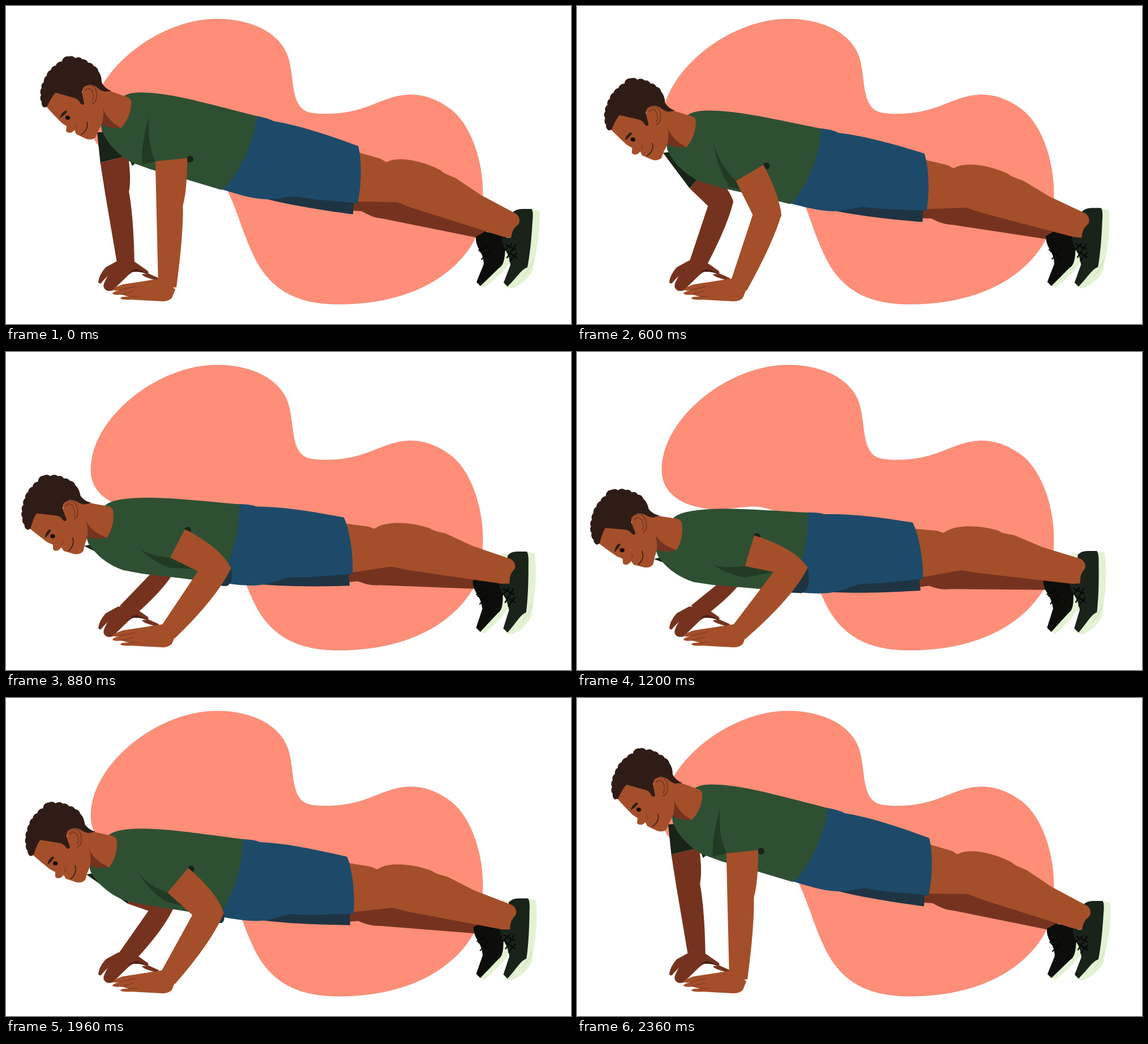
Animation of 998 by 561 pixels, one loop 2.4 s. Source, as an HTML page:

```html
<!DOCTYPE html>
<html lang="en">
<head>
<meta charset="utf-8">
<title>Push-up</title>
<style>
  html, body { margin: 0; width: 100%; height: 100%; overflow: hidden; background: #fff; }
  svg { display: block; width: 100vw; height: 100vh; }
  .skin { fill: #a44f2a; }
  .shade { fill: #75331f; }
  .hair { fill: #301c16; }
  .shirt { fill: #2f4f33; }
  .fold { fill: #223a24; }
  .dark { fill: #172417; }
  .sole { fill: #e2f2d2; }
  .line { fill: none; stroke-linecap: round; stroke-linejoin: round; }
</style>
</head>
<body>
<svg viewBox="0 0 998 561">
  <path fill="#ff8e78" stroke="#dc7c69" stroke-width=".6" d="M372 23C440 23 486 52 498 90C511 130 499 187 545 189.500Q556 191 567 190.500C620 190 645 174 675 164C720 148 755 160 785 182C822 210 842 275 842 330C842 370 836 397 826 415C793 474 715 526 588 526C520 526 470 505 440 445C420 405 412 370 395 333C385 305 365 285 340 277C305 266 285 278 245 277C190 275 150 252 150 208C150 115 270 23 372 23Z"/>

  <path id="farArm" class="shade"/>
  <path class="shade" d="M198 449L176 461Q164 475 163 487Q166 493 171 485L180 476Q170 492 173 497Q177 505 188 502L222 469L238 469L249 473Q254 471 250 467L227 451Z"/>
  <path fill="#4d2016" d="M217 474Q221 463 232 464L251 472L234 469Q224 467 217 474Z"/>
  <path class="shade" d="M240 473L252 472L270 480L268 485L252 480Q242 477 240 473Z"/>
  <path id="farSleeve" class="dark"/>

  <g class="body">
    <path class="shade" d="M610 343L692 343L725 355L850 396L846 405L838 410L665 375C645 373 637 366 628 362L612 361Z"/>
  </g>
  <g class="shoe">
    <path class="sole" d="M884 360L897 364L890 450Q888 462 845 497L836 493Z"/>
    <path fill="#0d0e0c" d="M846 398L884 405L881 440Q879 458 871 462L838 494L831 487L844 455Q843 440 836 430Q829 418 830 407Z"/>
    <path class="line" stroke="#050605" stroke-width="2" d="M837 433L854 444M840 447L855 431M835 431L850 424"/>
  </g>
  <g class="shoe">
    <path class="sole" d="M926 358L942 361C945 395 938 430 931 460C933 472 905 498 890 498L881 494Z"/>
    <path fill="#19231a" d="M894 365Q900 358 912 358L928 358Q932 361 930 380C928 415 925 440 921 461C911 464 903 478 886 495L879 488L891 457Q889 442 884 434Q875 418 876 408L892 409Z"/>
    <path class="line" stroke="#bccdab" stroke-width=".8" d="M931 448Q930 458 913 477"/>
    <path class="line" stroke="#070907" stroke-width="2.200" d="M883 421L901 430M885 433L902 444M885 444L901 421M880 432L893 420M890 450L902 436"/>
  </g>

  <g class="body">
    <path class="skin" d="M615 256L660 269C671 273 669 278 678 273C702 265 742 276 768 290C775 297 785 299 795 304L838 333L900 366C908 371 909 382 904 386C895 393 894 400 892 409L878 407L720 357C705 352 695 347 689 346L610 345Z"/>
    <path fill="#1f3443" d="M460 339L507 333L618 346L614 350L613 367.500C570 362 510 353 462 341Z"/>
    <path class="shirt" d="M205 162Q212 153 236 152.500C290 152 365 175 446 195L440 280L387 323L379 324L319 306L255 288L222 276C200 264 180 245 169 219L167 203L190 200Z"/>
    <path fill="#1d4a69" d="M443 194Q464 198 472 203C520 211 570 228 622 247C629 270 628 320 621 348L545 341L508 335.500C490 338 470 341.500 460 341C430 340 405 330 379 323L385 322C415 290 438 240 443 194Z"/>

    <path class="skin" d="M160 140L184 150L209 159Q222 162 221.500 171Q220 197 203 215Q183 215 168 206Z"/>
    <path class="shade" d="M169 171Q174 199 202 214.500Q184 217 169 208Z"/>
    <path class="skin" d="M70 176L84 150L130 155L165 135Q170 160 172 185Q173 206 163 220L158 232Q150 238 141 234L124 226L121 219L116 223Q108 225 106 220L107 212L98 206Q82 190 70 176Z"/>
    <path class="hair" d="M67 179a10 10 0 0 1 -4 -10a10 10 0 0 1 -1 -12a10 10 0 0 1 1 -12a10 10 0 0 1 4 -11a10 10 0 0 1 5 -11a10 10 0 0 1 7 -10a10 10 0 0 1 9 -8a10 10 0 0 1 11 -7a10 10 0 0 1 12 -9a10 10 0 0 1 11 3a10 10 0 0 1 13 2a10 10 0 0 1 10 6a10 10 0 0 1 10 6a10 10 0 0 1 8 9Q169 122 169 135Q174 145 186 150L174 151Q166 149 159 142L148 139Q136 142 134 152L138 172Q135 177 131 171Q128 164 120 162L88 153Q84 154 72 178Z"/>
    <path class="skin" d="M135 151Q134 142 144 140Q160 139 160 157Q160 171 150 173Q142 174 138 166Z"/>
    <path class="line" stroke="#75331f" stroke-width="1.500" d="M144 140Q160 139 160 157Q160 171 151 173M140 149Q146 142 152 149Q157 160 152 168"/>
    <ellipse cx="109" cy="197" rx="4.200" ry="3.600" fill="#160c09" transform="rotate(15 109 197)"/>
    <path class="hair" d="M95 198Q97 188 106 184L108 187Q103 193 95 198Z"/>
    <path class="line" stroke="#301c16" stroke-width="1.500" d="M143 205Q146 218 133 227"/>
    <path class="line" stroke="#75331f" stroke-width="1" d="M124 207Q127 211 123 214"/>
  </g>

  <path id="fold" class="fold"/>
  <path id="elbowShade" fill="#1d3540"/>
  <circle id="cuff" class="dark" r="6"/>
  <path id="nearArm" class="skin"/>
  <path class="skin" d="M279 480L240 486L207 491Q191 496 188 501Q192 503 202 501Q188 504 188 508Q194 511 204 509L217 513Q203 512 202 516Q206 519 222 518L276 521Q287 521 293 515L299 500Z"/>
  <path class="line" stroke="#75331f" stroke-width="1" d="M200 501L228 495M203 509L225 503M217 513L232 512"/>
</svg>
<script>
const $ = id => document.getElementById(id);
const setPath = (id, d) => $(id).setAttribute("d", d);
const setTransform = (selector, value) =>
  document.querySelectorAll(selector).forEach(g => g.setAttribute("transform", value));

// Small vector helpers; a point is [x, y]
const angle = (a, b) => Math.atan2(b[1] - a[1], b[0] - a[0]);
const shift = (a, dx, dy) => [a[0] + dx, a[1] + dy];
const mix = (a, b, t) => a.map((v, i) => v + (b[i] - v) * t);
const step = (a, dir, ahead, side) => shift(a,
  Math.cos(dir) * ahead - Math.sin(dir) * side,
  Math.sin(dir) * ahead + Math.cos(dir) * side);

const pivot = [887, 425.5];
const tilt = p => -11 * p;
function onBody(x, y, p) {
  const turn = tilt(p) * Math.PI / 180;
  return step(pivot, turn, x - pivot[0], y - pivot[1]);
}

// The forearm swings about the planted wrist while the shoulder follows the body.
const arms = {
  near: { shoulder: [294, 215], wrist: [285, 496], rest: 1.6, swing: 38, reach: 80,
    forearm: p => 145 - 40 * p * (1 - p), cuff: 28, elbow: 23.5, hand: 16 },
  far: { shoulder: [187, 222], wrist: [212, 458], rest: -7, swing: 53, reach: 60,
    forearm: p => 129 - 24 * Math.sqrt(p), cuff: 25, elbow: 21, hand: 15 },
};

function poseArm(arm, p) {
  const { wrist } = arm;
  const shoulder = onBody(...arm.shoulder, p);
  const raise = (arm.rest + arm.swing * p ** 0.47 - 90) * Math.PI / 180;
  const elbow = step(wrist, raise, arm.forearm(p), 0);
  const upper = angle(elbow, shoulder);
  const across = angle(wrist, shoulder);
  const half = arm.elbow + 7 * p;
  return {
    cuffIn: step(elbow, upper, arm.reach - 4, -arm.cuff),
    cuffOut: step(elbow, upper, arm.reach + 4, arm.cuff),
    elbowIn: step(elbow, across, 0, -half),
    elbowOut: step(elbow, across, 0, half),
    handIn: step(wrist, raise, 0, -arm.hand),
    handOut: step(wrist, raise, 0, arm.hand),
  };
}

function armOutline(a, p) {
  const muscle = (from, to, t, size) => step(mix(from, to, t), angle(from, to), 0, size);
  const calf = muscle(a.handOut, a.elbowOut, 0.65, 5 + 10 * p);
  const biceps = muscle(a.elbowOut, a.cuffOut, 0.35, 5 + 13 * p);
  return `M${a.cuffIn}L${a.elbowIn}L${a.handIn}L${a.handOut}` +
    `Q${calf} ${a.elbowOut}Q${biceps} ${a.cuffOut}Z`;
}

function drawSleeves(near, far, p) {
  setPath("farSleeve", `M${onBody(161, 223, p)}L${far.cuffIn}L${far.cuffOut}` +
    `L${shift(far.cuffOut, 7, 18)}L${shift(far.cuffOut, 15, 12)}L${onBody(205, 220, p)}Z`);

  const top = [253 - 11 * p - 13 * Math.sin(Math.PI * p), 194 + 182 * p];
  const hem = shift(near.cuffIn, -24 + 24 * Math.sqrt(p), 6 + 14 * p);
  const bend = shift(mix(top, hem, 0.5), -8, 4);
  const inner = mix(top, near.cuffIn, 0.5);
  setPath("fold", `M${top}Q${bend} ${hem}L${mix(near.cuffIn, near.elbowIn, p)}` +
    `L${near.cuffIn}Q${shift(inner, -10, 5)} ${top}Z`);

  const [x, y] = shift(near.cuffOut, 5, 2);
  $("cuff").setAttribute("cx", x);
  $("cuff").setAttribute("cy", y);

  const grown = (dx, dy) => shift(near.elbowOut, dx * p * p, dy * p * p);
  setPath("elbowShade", `M${near.elbowOut}Q${grown(7, 38)} ${grown(-11, 45)}L${grown(-30, 44)}Z`);
}

const ramp = (t, start) => Math.min(1, Math.max(0, (t - start) / 480));

function draw() {
  const t = performance.now() % 2400;
  const p = ramp(t, 478) - ramp(t, 1781);
  const near = poseArm(arms.near, p);
  const far = poseArm(arms.far, p);

  setTransform(".body", `rotate(${tilt(p)} ${pivot})`);
  // Heels lean forward and lift while the toes stay planted
  setTransform(".shoe", `translate(0 497) matrix(1 0 ${0.073 * p} ${1 + 0.051 * p} 0 0) translate(0 -497)`);
  setPath("nearArm", armOutline(near, p));
  setPath("farArm", armOutline(far, p));
  drawSleeves(near, far, p);
  requestAnimationFrame(draw);
}
draw();
</script>
</body>
</html>
```
